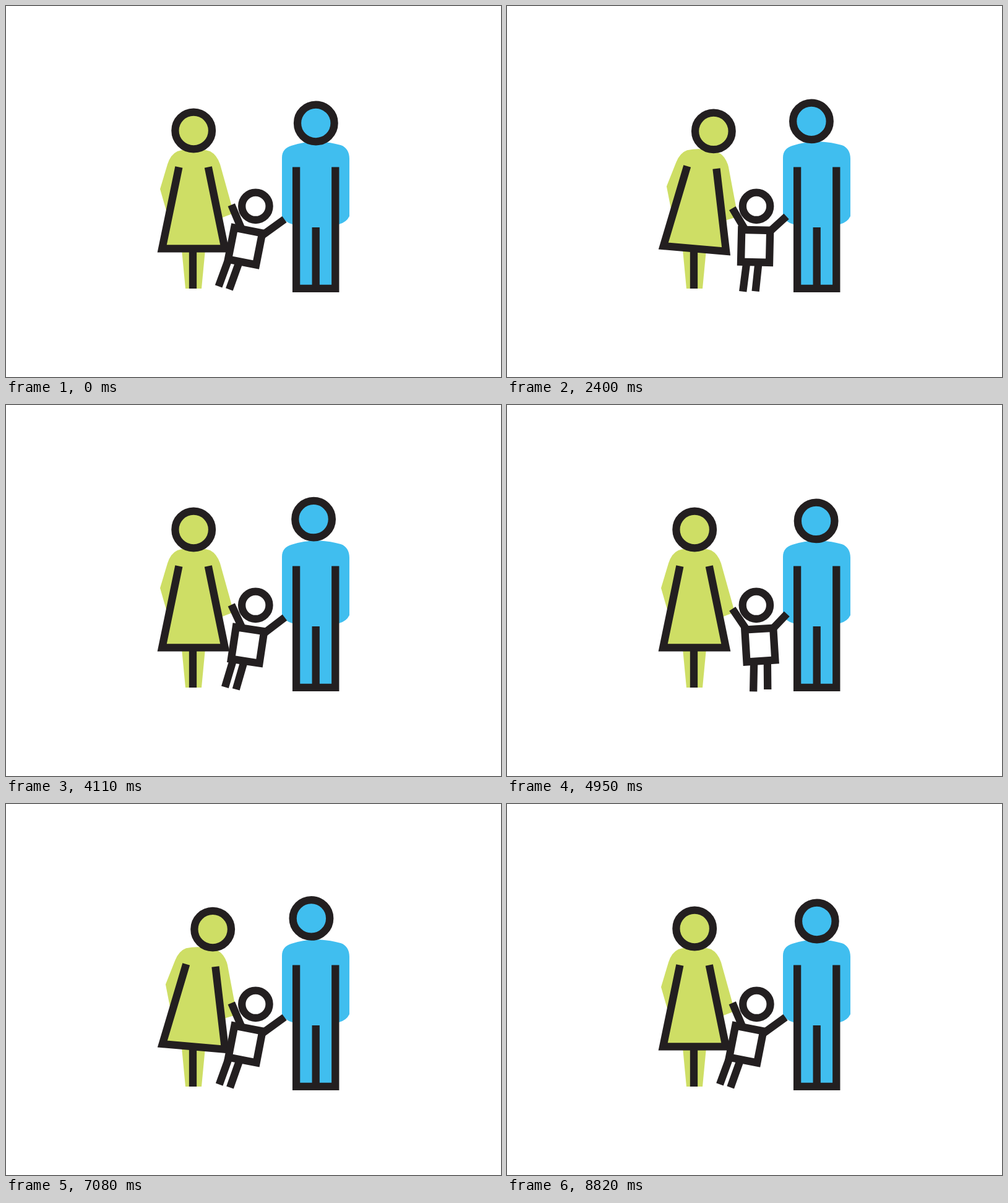
Recreate the animation shown at these times as an HTML page. Size 800 by 600 pixels, loop 8850 ms.

```html
<!DOCTYPE html>
<html lang="en">
<head>
<meta charset="utf-8">
<title>Family</title>
<style>
  html, body { margin: 0; width: 100%; height: 100%; overflow: hidden; background: #fff; }
  svg { display: block; width: 800px; height: 600px; }
  .line { fill: none; stroke: #231f20; stroke-width: 12.3; }
  .green { fill: #cede65; }
  .blue { fill: #40beef; }
  .white { fill: #fff; }
</style>
</head>
<body>
<svg viewBox="0 0 800 600">
  <path class="green" d="M284 394L290 457H316L322 394Z"/>
  <path class="line" d="M302 392V457"/>
  <g id="dress">
    <path class="green" d="M249 296L261 256Q266 240 277 235Q303 227 330 235Q341 241 346 256L368 335L350 342L353 390H253L259 331Z"/>
    <path class="line" d="M279.4 260.5L252.2 392.4H353.8L326.8 260.5"/>
  </g>
  <circle id="mum" class="line green" r="29.8"/>

  <path class="blue" d="M446 246C446 234 452 229 461 226Q500 213 541 225C550 228 555 236 555 247V340Q550 350 538 353V457H463V353Q451 350 446 340Z"/>
  <path class="line" d="M469.1 260.5V456.8H532.3V260.5M500.7 358V456"/>
  <circle id="dad" class="line blue" r="29.8"/>

  <path id="limbs" class="line"/>
  <rect id="torso" class="line white" x="-23" y="-26" width="46" height="52"/>
  <circle id="kid" class="line white" cy="323.8" r="22.2"/>
</svg>
<script>
const LOOP = 8850, STEP = 30, STEPS = LOOP / STEP;
const { sin, cos, PI } = Math;
const el = id => document.getElementById(id);
const mix = (a, b, u) => a + (b - a) * u;
const rad = a => a * PI / 180;
const ramp = (t, from, to) => Math.min(1, Math.max(0, (t - from) / (to - from)));
const ease = (t, from, to) => (1 - cos(PI * ramp(t, from, to))) / 2;

// Each parent moves twice per loop: out during [a, b], back during [c, d], in steps.
const LEAN = [[18, 42, 105, 137], [181, 203, 251, 286]];
const NOD = [[18, 43, 66, 137], [181, 204, 225, 286]];
const TURN = [[38, 64, 75, 178], [184, 206, 222, 290]];

// Amount out (0 to 1) and the lift of the head, which rises only on the way back.
function move(t, cycles, backCurve) {
  const [a, b, c, d] = cycles[t < cycles[1][0] ? 0 : 1];
  const back = backCurve(t, c, d);
  return { out: ease(t, a, b) - back, lift: back * (1 - back) };
}

// Child's swing: 1 is far left, 0 is far right; six swings that gradually slow down.
function swing(t) {
  const s = t / STEPS;
  const phase = 12 * s + 0.68 * sin(PI * s) ** 2 - 0.1 * sin(2 * PI * s);
  return (1 + cos(PI * phase)) / 2;
}

function place(id, x, y) {
  el(id).setAttribute("cx", x);
  el(id).setAttribute("cy", y);
}

function drawMum(t) {
  const angle = 4.9 * move(t, LEAN, ease).out, a = rad(angle);
  const nod = move(t, NOD, ramp);
  el("dress").setAttribute("transform", `rotate(${angle} 303 398)`);
  place("mum", 303.2 + 196.5 * sin(a) + 17.3 * nod.out, 398 - 196.5 * cos(a) + 3 * nod.out - 14 * nod.lift);
}

function drawDad(t) {
  const turn = move(t, TURN, ramp);
  place("dad", 500.8 - 9.3 * turn.out, 189.5 - 2.5 * turn.out - 16 * turn.lift);
}

function drawKid(t) {
  const u = swing(t), angle = mix(-11.5, 11.2, u), a = rad(angle);
  const x = mix(421, 386.6, u), y = 388.5 - 1.7 * (1 - u) ** 3;
  const arm = (hx, hy, sx, sy) => `M${hx} ${hy}L${sx} ${sy}`;
  const leg = (hip, drop, length, tilt) => {
    const hx = x + hip * cos(a) - drop * sin(a);
    const hy = y + hip * sin(a) + drop * cos(a);
    return `M${hx} ${hy}L${hx - length * sin(rad(tilt))} ${hy + length * cos(rad(tilt))}`;
  };
  el("limbs").setAttribute("d",
    arm(364.3, mix(334, 321.7, u), mix(394, 380, u), mix(370, 359, u)) +
    arm(mix(453.5, 450, u), mix(334, 345, u), mix(437, 414, u), mix(358, 371, u)) +
    leg(-10 - 13 * u * u, 29.5 + u, 46.5 - 4.5 * u, mix(-9.2, 20.2, u)) +
    leg(18.5 - 23.5 * u, 29.5, 42.5 + 2 * u, mix(-11.6, 19.8, u)));
  el("torso").setAttribute("transform", `translate(${x} ${y}) rotate(${angle})`);
  el("kid").setAttribute("cx", mix(402.6, 403.4, u));
}

function frame() {
  const t = Math.floor(performance.now() % LOOP / STEP);
  drawMum(t);
  drawDad(t);
  drawKid(t);
  requestAnimationFrame(frame);
}
frame();
</script>
</body>
</html>
```
